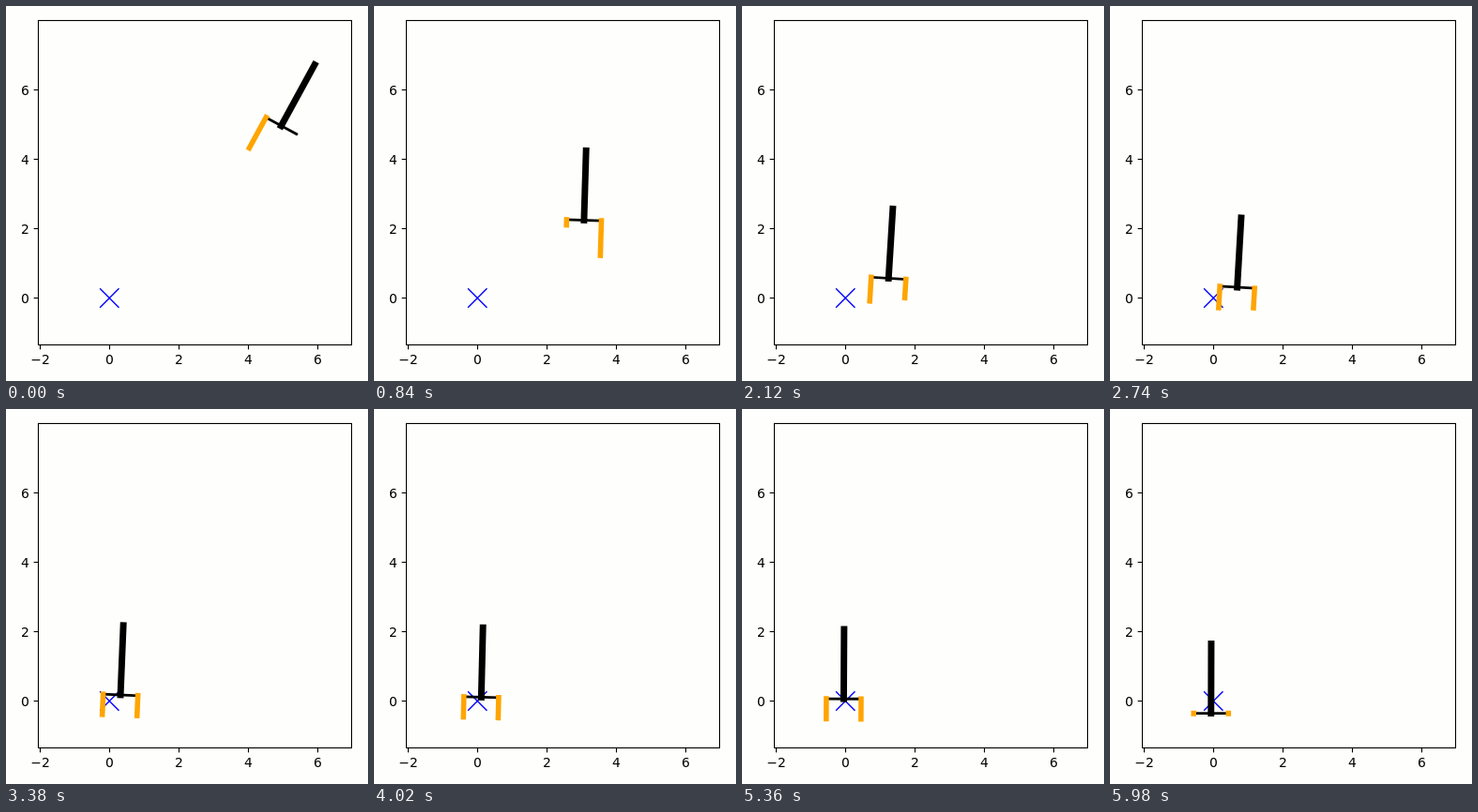
An HTML page with a canvas for the animation above (6000 ms loop, 386x400 px).

```html
<!DOCTYPE html>
<html lang="en">
<head>
<meta charset="utf-8">
<title>Rocket landing</title>
<style>
  html, body { margin: 0; width: 100%; height: 100%; overflow: hidden; background: #fefefc; }
  canvas { display: block; }
</style>
</head>
<body>
<canvas id="stage" width="386" height="400"></canvas>
<script>
const ctx = document.getElementById('stage').getContext('2d');
const LOOP = 6000, STEP = 20, UNIT = 37.08;
const px = x => 110.3 + x * UNIT;
const py = y => 311.5 - y * UNIT;

const clamp = v => Math.max(0, Math.min(1, v));
const bell = (t, mid, width) => Math.exp(-(((t - mid) / width) ** 2));

const HOVER = 0.58;
const cutoff = t => clamp((t - 5.45) / 0.53);  // engines fade out at the end

// The approach decays towards the goal, with an initial turn and a final drop
const posX = t => Math.exp(1.524 - 0.36 * t - 0.1075 * t * t) - 0.08
  + 0.43 * clamp(1 - t / 0.64) ** 2;
const posY = t => 0.05 + 5.635 * Math.exp(-1.125 * t)
  - 0.73 * clamp(1 - t / 0.45) ** 2 - 0.41 * cutoff(t) ** 3;

// Quick swing upright, then a slight lean that brakes the sideways motion
function tilt(t) {
  const s = t / 2.3;
  return 0.5 * Math.exp(-((t / 0.517) ** 2.4)) + 0.062 * (s * Math.exp(1 - s)) ** 5;
}

function thrust(t) {
  const lean = bell(t, 2, 0.7), power = 1 - 0.98 * cutoff(t);
  const left = HOVER + 0.11 * lean - 0.45 * bell(t, 0.9, 0.3) + 2 * Math.max(0, 0.7 - t);
  const right = t < 0.4 ? 0 : HOVER - 0.05 * lean + 0.6 * bell(t, 0.75, 0.55);
  return [clamp(left) * power, clamp(right) * power];
}

function line(x1, y1, x2, y2, color, width, cap = 'butt') {
  ctx.strokeStyle = color;
  ctx.lineWidth = width;
  ctx.lineCap = cap;
  ctx.beginPath();
  ctx.moveTo(x1, y1);
  ctx.lineTo(x2, y2);
  ctx.stroke();
}

function drawAxes() {
  ctx.font = '13.89px "DejaVu Sans", sans-serif';
  ctx.fillStyle = '#000';
  ctx.textAlign = 'center';
  for (let v = -2; v <= 6; v += 2) {
    const x = Math.floor(px(v)) + 0.5;
    line(x, 361.5, x, 366.4, '#000', 1.11);
    ctx.fillText(String(v).replace('-', '\u2212'), x, 382);
  }
  ctx.textAlign = 'right';
  for (let v = 0; v <= 6; v += 2) {
    const y = Math.floor(py(v)) + 0.5;
    line(29.6, y, 34.5, y, '#000', 1.11);
    ctx.fillText(v, 24.8, y + 5);
  }
  ctx.lineWidth = 1.11;
  ctx.strokeRect(34.5, 15.5, 334, 346);
}

function drawGoal() {
  const x = px(0), y = py(0), r = 10.2;
  line(x - r, y - r, x + r, y + r, '#00f', 1.39);
  line(x - r, y + r, x + r, y - r, '#00f', 1.39);
}

function drawRocket(t) {
  const x = posX(t), y = posY(t), a = tilt(t);
  const sin = Math.sin(a), cos = Math.cos(a);
  // Maps rocket coordinates (across, along) to the stage
  const at = (u, v) => [px(x + u * cos + v * sin), py(y - u * sin + v * cos)];
  const bar = (p, q, color, width) => line(...at(...p), ...at(...q), color, width, 'square');

  bar([0, 0], [0, 2], '#000', 6.94);
  bar([-0.5, 0], [0.5, 0], '#000', 2.78);
  thrust(t).forEach((power, i) => {
    if (power > 0) bar([i - 0.5, 0], [i - 0.5, -power], '#ffa500', 5.56);
  });
}

function draw(now) {
  const t = Math.floor((now % LOOP) / STEP) * STEP / 1000;
  ctx.fillStyle = '#fefefc';
  ctx.fillRect(0, 0, 386, 400);
  drawGoal();
  drawRocket(t);
  drawAxes();
}

let start = null;
function tick(now) {
  if (start === null) start = now;
  draw(now - start);
  requestAnimationFrame(tick);
}
draw(0);
requestAnimationFrame(tick);
</script>
</body>
</html>
```
